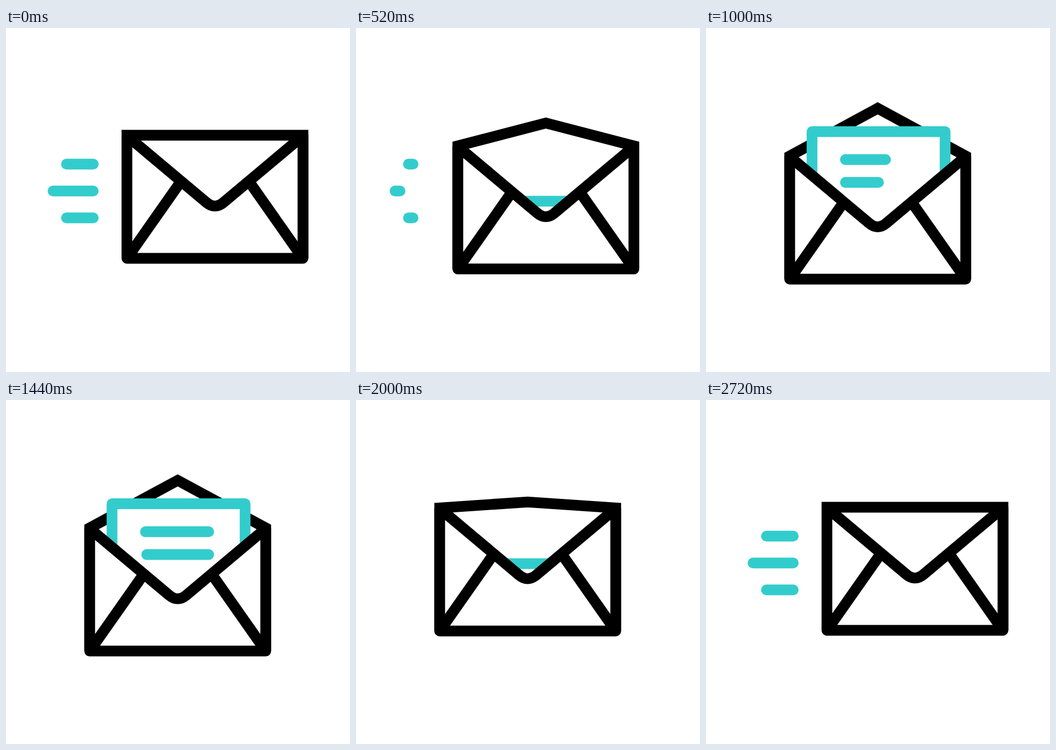
An HTML page for the animation above (3000 ms loop, 640x640 px).

```html
<!DOCTYPE html>
<html lang="en">
<head>
<meta charset="utf-8">
<title>Envelope</title>
<style>
  html, body { margin: 0; height: 100%; overflow: hidden; background: #fff; }
  svg { display: block; width: 100%; height: 100%; }
  path { fill: none; stroke: #000; stroke-width: 20; stroke-linejoin: round; }
  .teal { stroke: #3cc; }
  .paper { fill: #fff; }
  .round { stroke-linecap: round; }
</style>
</head>
<body>
<svg viewBox="0 0 640 640">
  <g id="dashes"></g>
  <g id="envelope">
    <path id="flap" stroke-linejoin="miter" style="stroke-linejoin: miter"/>
    <path id="letter" class="teal paper"/>
    <g id="lines"></g>
    <path class="paper" d="M-163.75 200.5L-16 324.5Q0 338 16 324.5L163.75 200.5V428.5H-163.75Z"/>
    <path d="M-163.75 428.5L-63 285M163.75 428.5L63 285"/>
  </g>
</svg>
<script>
const LOOP = 3000, STEP = 40;
const $ = id => document.getElementById(id);

// Symmetric cubic Bezier ease between two times; a is the handle length.
function ease(t, from, to, a = 0.5) {
  const u = Math.min(1, Math.max(0, (t - from) / (to - from)));
  if (u === 0 || u === 1) return u;
  let low = 0, high = 1, s;
  for (let i = 0; i < 24; i++) {
    s = (low + high) / 2;
    const r = 1 - s;
    const x = 3 * r * r * s * a + 3 * r * s * s * (1 - a) + s * s * s;
    if (x < u) low = s; else high = s;
  }
  return s * s * (3 - 2 * s);
}

function addStroke(parent) {
  const path = document.createElementNS("http://www.w3.org/2000/svg", "path");
  path.setAttribute("class", "teal round");
  return parent.appendChild(path);
}

function setStroke(path, x1, x2, y) {
  path.setAttribute("d", x2 - x1 > 0.05 ? `M${x1} ${y}H${x2}` : "");
}

const dashes = [
  { left: 112.5, y: 253.3, out: 680, back: 2660 },
  { left: 87.5, y: 303.3, out: 650, back: 2720 },
  { left: 112.5, y: 353.3, out: 680, back: 2660 }
].map(d => ({ ...d, path: addStroke($("dashes")) }));

const lines = [
  { y: 52, draw: [712, 1200], erase: [1440, 1920] },
  { y: 94.5, draw: [745, 1240], erase: [1400, 1880] }
].map(l => ({ ...l, path: addStroke($("lines")) }));

function render(t) {
  const slide = ease(t, 120, 910);
  const x = 388.75 - 69.3 * (slide - ease(t, 2000, 2720, 0.6));
  const y = 38.7 * (slide - ease(t, 1400, 2120, 0.6));
  $("envelope").setAttribute("transform", `translate(${x} ${y})`);

  const open = ease(t, 120, 940, 0.45) - ease(t, 1400, 2220);
  $("flap").setAttribute("d",
    `M-163.75 428.5V199.5L0 ${199.5 - 88.8 * open}L163.75 199.5V428.5`);

  const top = 344 - 190 * (ease(t, 316, 909) - ease(t, 1400, 2310));
  $("letter").setAttribute("d", `M-122.2 420V${top}H125.4V420`);

  for (const { path, y, draw, erase } of lines) {
    const start = -60 + 117.6 * ease(t, ...erase, 0.333);
    const end = -60 + 117.6 * ease(t, ...draw, 0.333);
    setStroke(path, start, end, top + y);
  }

  const drift = t < 1400 ? 29 * slide : 0;
  for (const { path, left, y, out, back } of dashes) {
    const shown = 1 - ease(t, 120, out, 0.42) + ease(t, 2000, back, 0.42);
    const start = left - drift;
    setStroke(path, start, start + (162.3 - left) * shown, y);
  }
}

function tick() {
  const t = performance.now() % LOOP;
  render(Math.floor(t / STEP) * STEP);
  requestAnimationFrame(tick);
}
tick();
</script>
</body>
</html>
```
